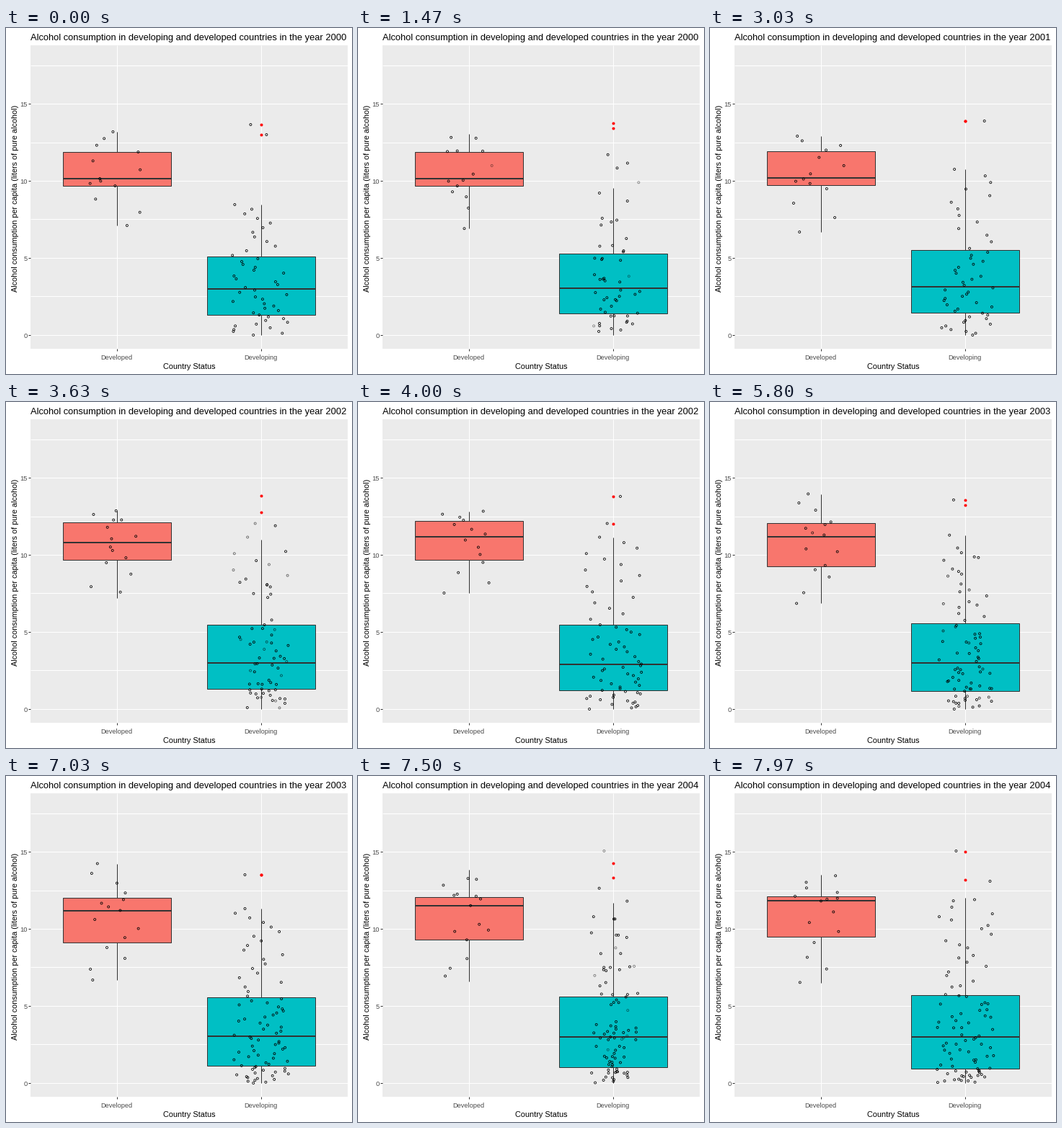
Animation, 480 px wide and 480 px high, one loop 8 s. Source, as a matplotlib script:

```python
import numpy as np
import matplotlib.pyplot as plt
from matplotlib.animation import FuncAnimation
from matplotlib.patches import Rectangle

SIZE, DPI = 480, 80
PX = 72 / DPI              # points per pixel
FPS, HOLD, MOVE = 30, 30, 30
FIRST_YEAR = 2000
CENTRES = (154, 354)
FILLS = ("#F8766D", "#00BFC4")
DARK, GREY = "#333333", "#4D4D4D"
JITTER = 40
SHUFFLE = 0.12             # how far a country's rank drifts from year to year

# Per year and group: upper whisker, Q3, median, Q1, lower whisker
BOXES = np.array([
    [[144, 172, 209, 219, 274], [245, 317, 362, 397.5, 426]],
    [[150, 171, 208, 218, 283], [196, 308, 359, 395, 426]],
    [[151.5, 165, 186.5, 219, 265], [187.5, 309, 363.5, 400, 426]],
    [[121.5, 169, 186.5, 230.5, 283], [184, 307, 361, 401.5, 426]],
    [[138, 167, 173, 223, 287], [168, 304, 362, 406.5, 426]],
])
OUTLIERS = np.array([[134, 148], [129, 129], [131, 168.5], [137, 137], [104, 144]])
COUNTS = ((13, 14, 14, 15, 15), (48, 51, 67, 79, 88))

rng = np.random.default_rng(11)


def mix(a, b, t):
    return a + (b - a) * t


def heights(n, box, extra):
    """n heights, top to bottom, whose quartiles are those of the box."""
    inner = np.interp(np.linspace(0, 1, n - len(extra)), np.linspace(0, 1, 5), box)
    return np.concatenate([extra, inner])


def poses(group):
    """One jittered dot cloud per year; each country keeps its row."""
    standing = rng.random(max(COUNTS[group]))
    clouds = []
    for year, n in enumerate(COUNTS[group]):
        extra = np.unique(OUTLIERS[year]) if group else []
        rank = (standing[:n] + rng.normal(0, SHUFFLE, n)).argsort().argsort()
        x = CENTRES[group] + rng.uniform(-JITTER, JITTER, n)
        clouds.append(np.column_stack([x, heights(n, BOXES[year, group], extra)[rank]]))
    return clouds


CLOUDS = [poses(group) for group in range(2)]


def cloud_at(group, i, t):
    """Positions and opacities: shared rows glide, new rows fade in."""
    a, b = CLOUDS[group][i:i + 2]
    n = len(a)
    pos = np.vstack([mix(a, b[:n], t), b[n:]])
    return pos, np.where(np.arange(len(b)) < n, 1, t)


# Stage in pixel coordinates, y pointing down
plt.rcParams["font.family"] = "Liberation Sans"
fig = plt.figure(figsize=(SIZE / DPI, SIZE / DPI), dpi=DPI, facecolor="white")
ax = fig.add_axes([0, 0, 1, 1])
ax.set(xlim=(0, SIZE), ylim=(SIZE, 0))
ax.axis("off")


def line(x, y, color, width=1, z=1):
    return ax.plot(x, y, color=color, lw=width * PX, zorder=z,
                   solid_capstyle="butt")[0]


def label(x, y, text, size, color="black", **kw):
    return ax.text(x, y, text, size=size * PX, color=color, **kw)


ax.add_patch(Rectangle((34, 24), 440, 421, fc="#EBEBEB", lw=0, zorder=0))
for half in range(8):
    y = int(426 - 53.4 * half)
    line([34, 474], [y, y], "white")
    if half % 2 == 0:
        line([31, 34], [y, y], DARK)
        label(29.5, y + 4, f"{half * 5 // 2}", 9.3, GREY, ha="right")
for cx, name in zip(CENTRES, ("Developed", "Developing")):
    line([cx, cx], [24, 445], "white")
    line([cx, cx], [445, 448], DARK)
    label(cx - 0.5, 459.5, name, 9.3, GREY, ha="center")
label(254, 473, "Country Status", 10.9, ha="center")
label(18, 236, "Alcohol consumption per capita (liters of pure alcohol)", 10.7,
      rotation=90, ha="right", va="center")
title = label(34, 17.5, "", 12.93)

boxes = []
for cx, fill in zip(CENTRES, FILLS):
    rect = ax.add_patch(Rectangle((cx - 75, 0), 150, 1, fc=fill, ec=DARK,
                                  lw=PX, zorder=3))
    boxes.append((rect, line([cx, cx], [0, 0], DARK, 1, 2),
                  line([cx - 75, cx + 75], [0, 0], DARK, 2, 4)))
red = ax.scatter([], [], s=(4 * PX) ** 2, c="red", lw=0, zorder=5)
dots = ax.scatter([], [], s=(3 * PX) ** 2, fc="none", ec="black",
                  lw=0.8 * PX, zorder=6)


def draw(frame):
    i, step = divmod(frame, HOLD + MOVE)
    t = max(0, step - HOLD) / MOVE
    title.set_text("Alcohol consumption in developing and developed countries "
                   f"in the year {FIRST_YEAR + i + (t >= 0.5)}")

    stats = mix(BOXES[i], BOXES[i + 1], t)
    for (rect, whisker, median), (top, q3, med, q1, low) in zip(boxes, stats):
        rect.set_y(q3)
        rect.set_height(q1 - q3)
        whisker.set_ydata([top, low])
        median.set_ydata([med, med])
    ys = mix(OUTLIERS[i], OUTLIERS[i + 1], t)
    red.set_offsets([(CENTRES[1], y) for y in ys])

    pos, alpha = map(np.concatenate, zip(*(cloud_at(g, i, t) for g in range(2))))
    dots.set_offsets(pos)
    dots.set_edgecolors([(0, 0, 0, a) for a in alpha])
    return [title, red, dots]


anim = FuncAnimation(fig, draw, frames=(len(BOXES) - 1) * (HOLD + MOVE),
                     interval=1000 / FPS, repeat=True, repeat_delay=0)
plt.show()
```
